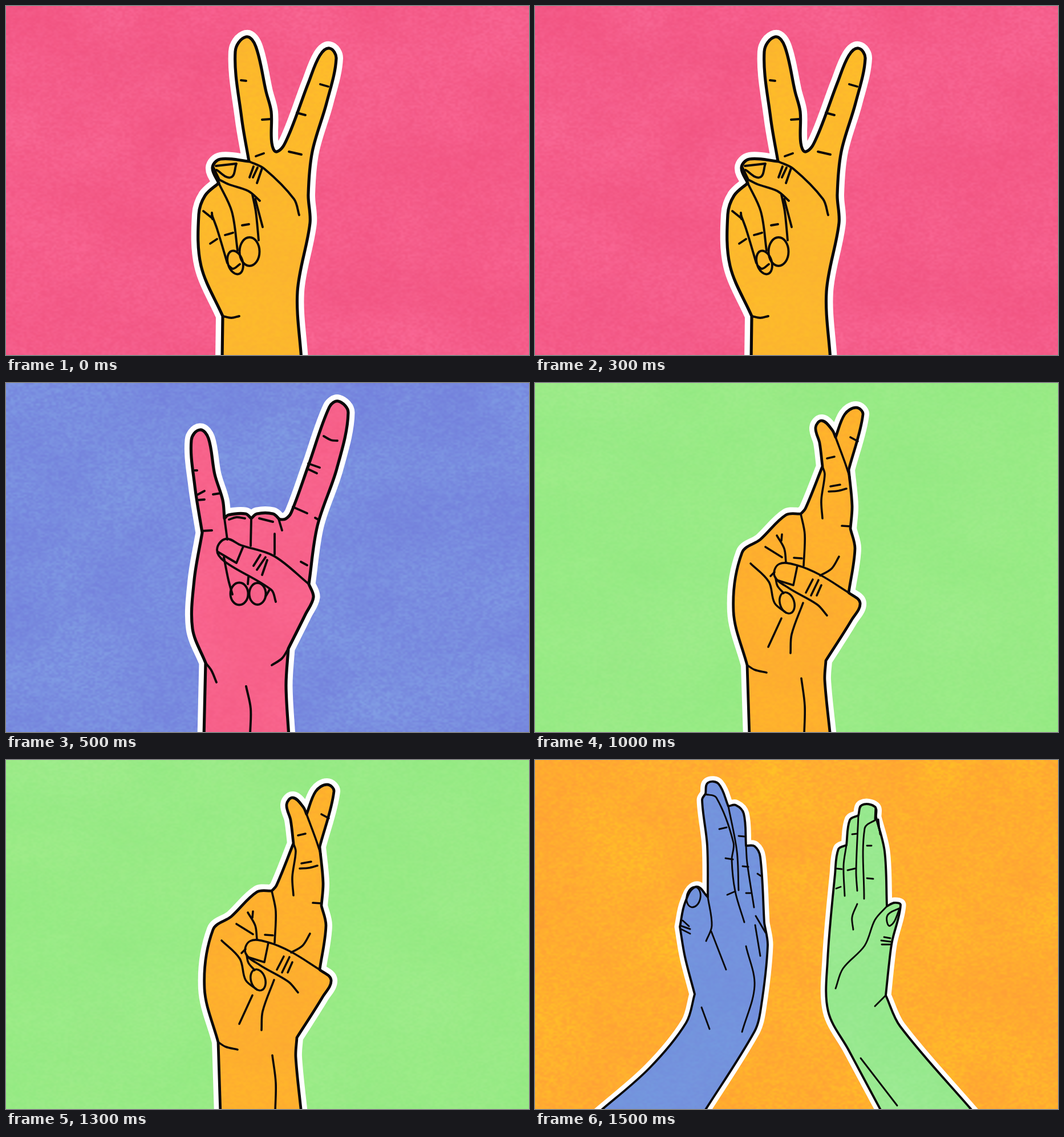
These frames come from a looping animation (917 by 611 pixels, 2 s). An HTML page with a canvas:

```html
<!DOCTYPE html>
<html lang="en">
<head>
<meta charset="utf-8">
<title>Hand signs</title>
<style>
html, body { margin: 0; width: 100%; height: 100%; overflow: hidden; }
canvas { display: block; width: 917px; height: 611px; }
</style>
</head>
<body>
<canvas id="stage" width="917" height="611"></canvas>
<script>
const W = 917, H = 611, HOLD = 500, INK = '#0b0909';
let ctx, seed = 7;

const random = () => (seed = seed * 16807 % 2147483647) / 2147483647;

function makeCanvas(w, h) {
  return Object.assign(document.createElement('canvas'), { width: w, height: h });
}

// Random specks of one colour, smoothly enlarged to the given cell size.
function speckle(colour, cellW, cellH, strength) {
  const cols = Math.ceil(W / cellW) + 1, rows = Math.ceil(H / cellH) + 1;
  const small = makeCanvas(cols, rows), dots = small.getContext('2d');
  dots.fillStyle = colour;
  for (let i = 0; i < cols * rows; i++) {
    dots.globalAlpha = strength * random();
    dots.fillRect(i % cols, Math.floor(i / cols), 1, 1);
  }
  ctx.drawImage(small, 0, 0, cols * cellW, rows * cellH);
}

function paint(base, dark, light, strength) {
  ctx.fillStyle = base;
  ctx.fillRect(0, 0, W, H);
  speckle(light, 110, 90, strength * 1.3);
  speckle(dark, 75, 60, strength);
  speckle(light, 9, 5, strength * 0.6);
  speckle(dark, 4, 3, strength);
}

// Smooth curve through the points; "/" marks a corner.
function spline(text) {
  let d = '', last;
  for (const part of text.split('/')) {
    const p = part.trim().match(/\S+ \S+/g).map(pair => pair.split(' ').map(Number));
    if (last) p.unshift(last);
    else d = `M${p[0]}`;
    const handle = (i, reach) => {
      const a = p[Math.max(i - 1, 0)], b = p[Math.min(i + 1, p.length - 1)];
      const k = reach / (Math.hypot(b[0] - a[0], b[1] - a[1]) || 1);
      return [p[i][0] + (b[0] - a[0]) * k, p[i][1] + (b[1] - a[1]) * k];
    };
    for (let i = 1; i < p.length; i++) {
      const reach = Math.hypot(p[i][0] - p[i - 1][0], p[i][1] - p[i - 1][1]) / 3;
      d += `C${handle(i - 1, reach)} ${handle(i, -reach)} ${p[i]}`;
    }
    last = p[p.length - 1];
  }
  return new Path2D(d);
}

function stroke(path, colour, width) {
  ctx.strokeStyle = colour;
  ctx.lineWidth = width;
  ctx.stroke(path);
}

function hand(fill, dark, light, pen, rim, outline) {
  const shape = spline(outline);
  stroke(shape, '#fff', rim);
  ctx.save();
  ctx.clip(shape);
  paint(fill, dark, light, 0.35);
  ctx.restore();
  stroke(shape, INK, pen);
  ctx.lineWidth = pen * 0.75;
}

function line(text) {
  ctx.stroke(spline(text));
}

function oval(x, y, rx, ry, tilt = 0) {
  ctx.beginPath();
  ctx.ellipse(x, y, rx, ry, tilt, 0, 2 * Math.PI);
  ctx.stroke();
}

function peace() {
  paint('#f65f8d', '#ee4d7a', '#fb719d', 0.5);
  hand('#fdbb2e', '#f9a936', '#ffc51f', 5.2, 24, `379 620 380 543 / 342 455 338 365 349 332 373 310 /
    362 283 376 268 426 272 / 413 195 402 80 421 54 438 71 456 150 465 185 466 240 475 255
    493 232 530 135 550 87 567 74 579 92 562 170 537 255 530 330 533 380 511 500 518 620`);
  // thumb
  line('364 283 374 304 / 390 312 425 324 445 341');
  line('426 272 453 285 505 338 514 366');
  line('368 280 404 276 / 394 300 369 287');
  line('434 281 427 300');
  line('441 283 433 300');
  line('449 284 440 310');
  // folded fingers
  line('373 310 396 360 406 428');
  line('361 366 370 390 388 450');
  line('346 359 361 371');
  line('361 362 362 373');
  line('432 330 438 360 443 410');
  line('437 338 450 387');
  oval(427, 430, 17.5, 25);
  oval(402, 449, 13, 21, -0.3);
  line('391 455 398 460 410 452');
  // creases
  line('358 416 370 408');
  line('384 401 398 397');
  line('414 384 426 382');
  line('412 130 421 131');
  line('449 199 463 198');
  line('551 137 565 141');
  line('510 187 525 191');
  line('438 263 452 258');
  line('496 255 518 260');
  line('380 543 395 546 409 543');
}

function horns() {
  paint('#7b92e0', '#7079da', '#86a8e6', 0.6);
  hand('#f8638d', '#f0557d', '#fb7398', 5.2, 23, `347 620 350 490 / 327 430 330 345 344 262 /
    331 180 325 100 340 82 355 97 366 160 380 205 383 237 / 390 231 420 229 430 237 /
    440 229 468 229 480 239 / 490 238 500 227 530 145 567 42 583 32 600 52 580 150 546 250 531 352 /
    539 375 525 405 495 465 / 491 530 496 620`);
  // folded fingers
  line('383 237 388 274');
  line('430 237 429 285');
  line('471 264 471 300');
  line('478 238 484 258');
  line('391 239 404 235 419 237');
  line('444 237 468 243');
  line('382 305 390 345 397 370');
  line('425 340 424 352');
  oval(409, 369, 15.5, 19.5);
  oval(441, 369, 14.5, 19);
  line('462 362 455 374');
  // thumb
  line('531 352 470 303 412 284 385 273 370 292 384 313 465 362 473 383');
  line('372 296 404 315 / 416 286');
  line('446 301 434 320');
  line('455 305 440 327');
  line('458 310 449 336');
  // creases
  line('557 93 570 100 581 101');
  line('530 141 550 148');
  line('528 150 545 158');
  line('503 217 528 228');
  line('542 236 549 240');
  line('517 313 528 319');
  line('331 153 335 153');
  line('333 197 348 189');
  line('335 205 348 204');
  line('363 195 376 193');
  line('344 259 361 258');
  line('350 490 360 503 369 524');
  line('495 465 484 482 466 494');
  line('421 531 429 570 428 615');
}

function crossed() {
  paint('#9bea87', '#88e77a', '#a9ec93', 0.35);
  hand('#ffb32e', '#fa9d38', '#ffc024', 4.8, 22, `376 620 372 494 / 348 400 363 297 395 274
    440 231 466 229 / 474 220 504 146 / 499 105 492 78 503 66 521 82 527 95 / 543 55 563 43 575 55
    550 152 / 556 215 553 255 / 561 290 550 367 / 570 385 555 415 510 486 / 508 520 518 620`);
  // front finger
  line('527 95 543 138 552 165');
  line('504 146 508 160 502 205 504 237');
  line('512 132 525 129');
  line('518 181 535 178');
  line('515 190 530 189 546 185');
  line('553 95 566 102');
  line('538 250 553 251');
  // folded fingers
  line('466 229 473 265 471 320');
  line('424 267 437 290 440 314');
  line('404 287 433 305');
  line('433 265 432 276');
  line('454 306 468 307');
  line('378 316 410 348 420 385 440 402');
  oval(442, 385, 12.5, 19, -0.3);
  line('413 338 420 331');
  line('422 342 425 355 436 368');
  // thumb
  line('550 367 500 336 459 319 428 317 420 338 445 359 495 388 512 407');
  line('424 345 453 354 / 460 320');
  line('487 344 475 367');
  line('497 345 484 372');
  line('502 354 494 372');
  line('500 337 520 325 533 304');
  // palm and wrist
  line('432 412 409 462');
  line('470 385 450 440 448 473');
  line('372 494 385 502 406 507');
  line('467 517 473 565 472 615');
}

function leftPalm() {
  hand('#7093da', '#7484da', '#7aa2e2', 3.9, 19, `108 620 200 540 265 460 280 410 / 263 345 254 292 /
    263 250 282 222 303 240 / 302 150 293 70 299 59 / 303 40 322 42 339 81 / 352 79 366 94 370 150 /
    385 151 395 170 402 285 / 408 325 396 435 385 475 294 620`);
  // fingers
  line('299 60 318 66 348 145 345 175 351 230 367 284');
  line('339 81 354 160 357 228');
  line('337 236 351 230');
  line('370 150 372 180 384 258');
  line('323 121 336 118');
  line('334 172 347 174');
  line('357 133 368 134');
  line('364 186 374 187');
  line('390 199 396 203');
  line('370 233 378 233');
  // palm
  line('387 273 404 302');
  line('386 289 395 343');
  line('370 326 385 395 363 476');
  line('292 433 306 471');
  // thumb
  line('303 240 310 290 300 317');
  line('309 300 335 367');
  oval(278, 240, 12, 18, 0.2);
  line('259 281 270 291');
  line('255 290 272 296');
  line('256 296 272 304');
}

function rightPalm() {
  hand('#99e88e', '#88e482', '#a8eca0', 3.9, 19, `610 620 550 508 514 440 513 350 526 200 532 156 546 149 /
    552 105 567 97 / 573 79 596 82 598 100 / 613 160 617 256 / 630 250 641 254 626 318 621 355 615 412 /
    640 466 772 620`);
  // fingers
  line('546 149 541 185 543 238');
  line('567 97 563 195 565 229');
  line('598 104 578 120 577 243');
  line('597 82 596 103');
  line('599 104 606 131');
  line('602 104 605 130');
  line('556 130 565 129');
  line('582 150 590 150');
  line('582 207 593 208');
  line('528 190 538 191');
  line('528 225 536 222');
  line('548 193 561 190');
  // thumb
  line('565 252 556 275 558 297');
  line('617 256 596 280 578 325 540 365 527 400');
  line('640 259 618 272 623 290 640 259');
  line('612 310 623 312');
  line('607 316 623 318');
  line('608 323 624 323');
  // wrist
  line('615 412 596 431');
  line('571 522 635 605');
}

function palms() {
  paint('#ffb431', '#ff9a38', '#ffcb20', 0.65);
  leftPalm();
  rightPalm();
}

const pictures = [peace, horns, crossed, palms].map(draw => {
  const picture = makeCanvas(W, H);
  ctx = picture.getContext('2d');
  ctx.lineCap = ctx.lineJoin = 'round';
  ctx.imageSmoothingQuality = 'high';
  draw();
  return picture;
});

const stage = document.getElementById('stage').getContext('2d');
function render() {
  const index = Math.floor(performance.now() / HOLD) % pictures.length;
  stage.drawImage(pictures[index], 0, 0);
  requestAnimationFrame(render);
}
render();
</script>
</body>
</html>
```
